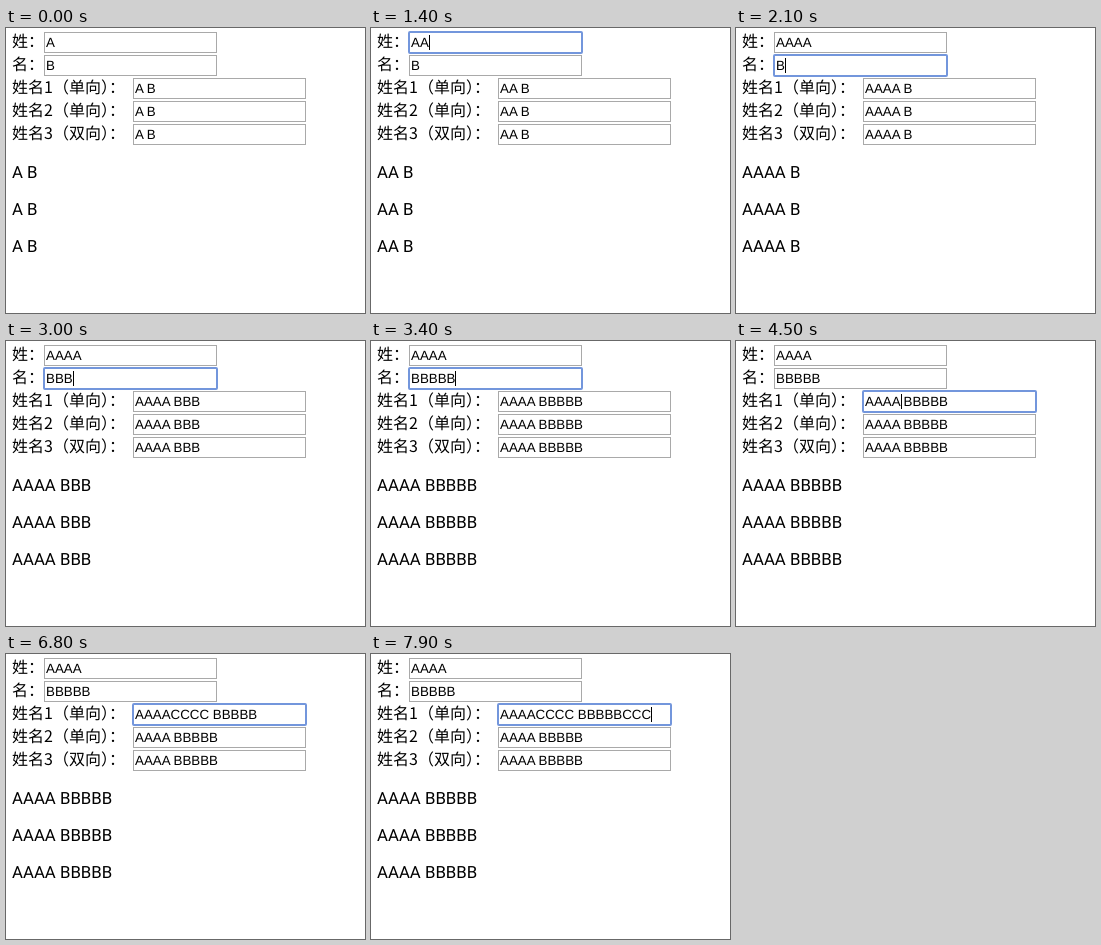
An HTML page that plays this animation: 359x285 px, repeating every 8 s.

```html
<!DOCTYPE html>
<html lang="zh-CN">
<head>
<meta charset="utf-8">
<title>姓名</title>
<style>
  html, body { margin: 0; width: 100%; height: 100%; overflow: hidden; background: white; }
  svg { display: block; }
  text { fill: black; font-kerning: none; text-rendering: geometricPrecision; }
  .label { font: 16px "Noto Sans CJK SC", "Noto Sans CJK", sans-serif; }
  .value { font: 13.333px "Liberation Sans", Arial, sans-serif; }
  .para { font: 16.8px Roboto, "Open Sans", sans-serif; }
  .box { fill: white; stroke: darkgray; }
  .ring { fill: none; stroke: #7396dc; stroke-width: 2; }
</style>
</head>
<body>
<svg id="stage" width="359" height="285"></svg>
<script>
const LOOP = 8000;
const FONT_SIZE = 13.3333;
const ADVANCE = { A: 0.667, B: 0.667, C: 0.7222, ' ': 0.2778 };
const LABELS = ['姓：', '名：', '姓名1（单向）：', '姓名2（单向）：', '姓名3（双向）：'];

// Each action changes the form state; its start times are listed beside it.
const focus = (field, at) => s => { s.field = field; s.at = at; s.caret = true; };
const blink = s => { s.caret = !s.caret; };
const type = letter => s => {
  const old = s.values[s.field];
  s.values[s.field] = old.slice(0, s.at) + letter + old.slice(s.at);
  s.at++;
  s.caret = true;
  if (s.field < 2) s.values[2] = fullName(s);
};
const fullName = s => s.values[0] + ' ' + s.values[1];

const EVENTS = [
  [focus(0, 1), 600],
  [focus(1, 1), 2100],
  [focus(2, 4), 4500],
  [focus(2, 14), 7400],
  [blink, 1100, 2600, 3900, 4300, 5000, 5500, 6800, 7300],
  [type('A'), 1400, 1600, 1800],
  [type('B'), 2800, 3000, 3200, 3400],
  [type('C'), 5800, 5900, 6200, 6400, 7600, 7700, 7900],
].flatMap(([act, ...times]) => times.map(time => ({ time, act })))
  .sort((a, b) => a.time - b.time);

const stage = document.getElementById('stage');

function add(tag, attrs, content = '') {
  const el = document.createElementNS('http://www.w3.org/2000/svg', tag);
  for (const key in attrs) el.setAttribute(key, attrs[key]);
  el.textContent = content;
  stage.appendChild(el);
  return el;
}

const fields = LABELS.map((label, i) => {
  const x = i < 2 ? 38 : 127;
  const y = 4 + 23 * i;
  add('text', { class: 'label', x: 6, y: y + 15 }, label);
  add('rect', { class: 'box', x: x + 0.5, y: y + 0.5, width: 172, height: 20 });
  const text = add('text', { class: 'value', x: x + 2, y: y + 15 });
  return { x, y, text };
});

const paras = [150, 187, 224].map(y => add('text', { class: 'para', x: 6, y }));
const ring = add('rect', { class: 'ring', width: 173, height: 21, rx: 1 });
const caret = add('rect', { width: 1, height: 15 });

function place(el, visible, x, y) {
  el.setAttribute('visibility', visible ? 'visible' : 'hidden');
  if (!visible) return;
  el.setAttribute('x', x);
  el.setAttribute('y', y);
}

function textWidth(s) {
  return [...s].reduce((sum, c) => sum + ADVANCE[c] * FONT_SIZE, 0);
}

function render(t) {
  const state = { values: ['A', 'B', 'A B'], field: -1, at: 0, caret: false };
  for (const e of EVENTS) if (e.time <= t) e.act(state);

  const full = fullName(state);
  fields.forEach((f, i) => { f.text.textContent = state.values[i] ?? full; });
  paras.forEach(p => { p.textContent = full; });

  const { x, y } = fields[state.field] ?? fields[0];
  const before = (state.values[state.field] ?? '').slice(0, state.at);
  const caretX = Math.round(x + 2 + textWidth(before) - 0.05);
  place(ring, state.field >= 0, x, y);
  place(caret, state.caret, caretX, y + 3);
}

const start = performance.now();

function tick() {
  render(Math.max(0, performance.now() - start) % LOOP);
  requestAnimationFrame(tick);
}
tick();
</script>
</body>
</html>
```
